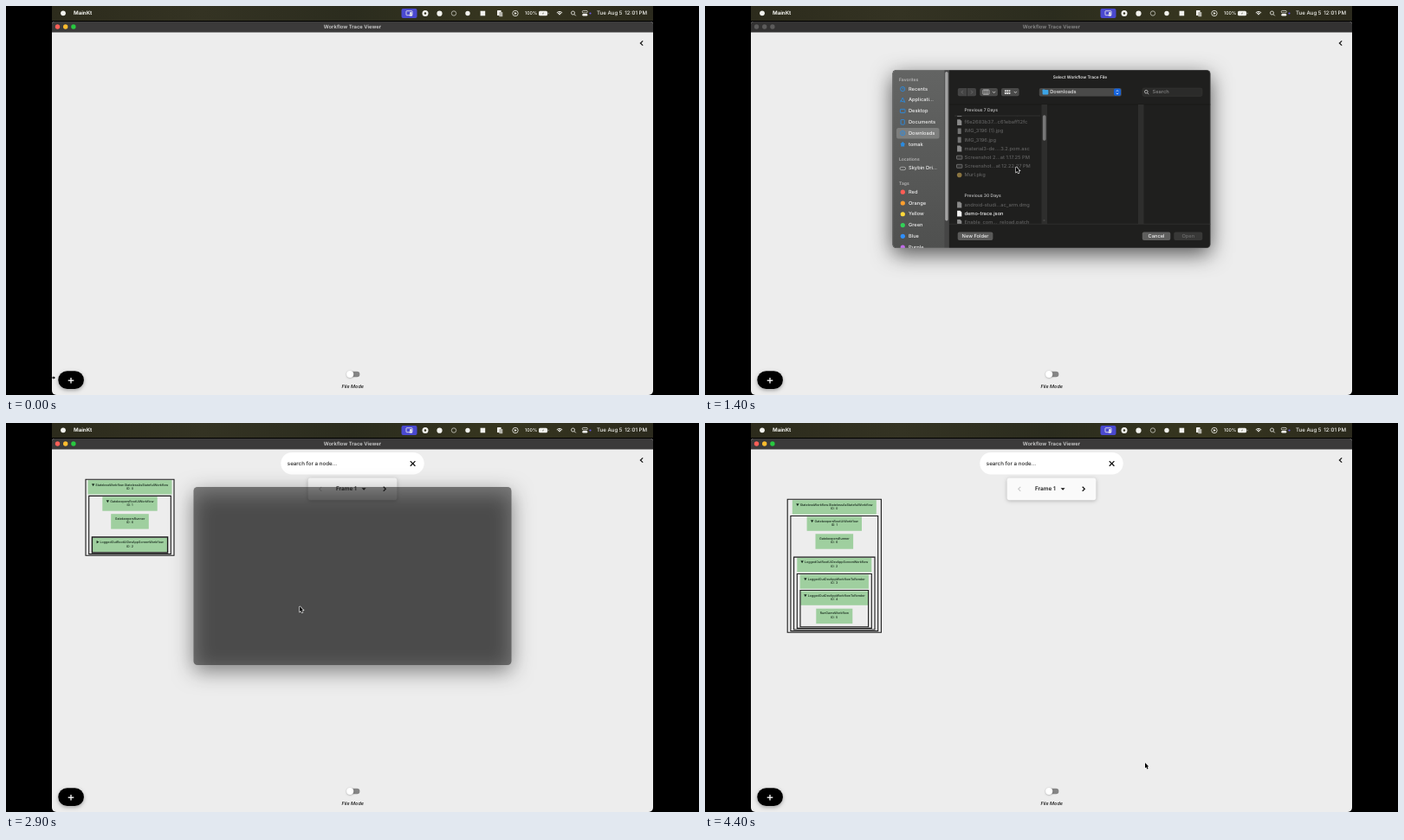
Animation of 800 by 450 pixels, one loop 4500 ms. Source, as an HTML page with a canvas:

```html
<!DOCTYPE html>
<html lang="en">
<head>
<meta charset="utf-8">
<title>Workflow Trace Viewer</title>
<style>
html, body { margin: 0; width: 100%; height: 100%; overflow: hidden; background: #000; }
canvas { display: block; }
</style>
</head>
<body>
<canvas id="stage" width="800" height="450"></canvas>
<script>
const ctx = document.getElementById('stage').getContext('2d');
const LOOP = 4500, STEP = 100, ROW = 10.15;
const BLUE = '#2b8be0';

function box(x, y, w, h, r, fill, stroke, width = 1) {
  ctx.beginPath();
  ctx.roundRect(x, y, w, h, r);
  if (fill) { ctx.fillStyle = fill; ctx.fill(); }
  if (stroke) { ctx.strokeStyle = stroke; ctx.lineWidth = width; ctx.stroke(); }
}

function dot(x, y, r, fill, stroke, width) {
  box(x - r, y - r, 2 * r, 2 * r, r, fill, stroke, width);
}

function line(points, color, width = 1) {
  ctx.beginPath();
  points.forEach(([x, y]) => ctx.lineTo(x, y));
  ctx.strokeStyle = color;
  ctx.lineWidth = width;
  ctx.stroke();
}

function poly(points, fill) {
  ctx.beginPath();
  points.forEach(([x, y]) => ctx.lineTo(x, y));
  ctx.closePath();
  ctx.fillStyle = fill;
  ctx.fill();
}

function text(s, x, y, size, color, weight = 500, align = 'left', style = 'normal') {
  ctx.font = `${style} ${weight} ${size}px Inter, "Noto Sans", sans-serif`;
  ctx.textAlign = align;
  ctx.textBaseline = 'middle';
  ctx.fillStyle = color;
  ctx.fillText(s, x, y);
}

function chevron(x, y, dx, dy, color, width = 1.2) {
  line([[x + dx, y - dy], [x - dx, y], [x + dx, y + dy]], color, width);
}

function shadowed(color, blur, dy, draw) {
  ctx.save();
  ctx.shadowColor = color;
  ctx.shadowBlur = blur;
  ctx.shadowOffsetY = dy;
  draw();
  ctx.restore();
}

// Linear interpolation over keys of the form [time, ...values].
function at(keys, t) {
  let i = keys.findIndex(k => k[0] > t);
  if (i < 0) return keys[keys.length - 1].slice(1);
  if (i === 0) return keys[0].slice(1);
  const a = keys[i - 1], b = keys[i], p = (t - a[0]) / (b[0] - a[0]);
  return a.slice(1).map((v, j) => v + (b[j + 1] - v) * p);
}

const pointerPath = [
  [0, 54, 430], [300, 74, 431], [500, 75, 432], [800, 149, 386], [1100, 310, 222],
  [1400, 359, 186], [1900, 357, 190], [2300, 339, 212], [2900, 339, 212],
  [3100, 106, 138], [3200, 108, 140], [3300, 112, 158], [3400, 116, 178],
  [3600, 404, 251], [3700, 402, 252], [4200, 504, 394], [4300, 507, 394], [4400, 508, 393]
];
const scrollPath = [[1200, 0], [1400, 74.5], [1700, 185], [2300, 268.9]];

const shots = ['10.20.07 AM', '', '10.55.14 AM', '11.44.33 AM', '11.52.30 AM']
  .map(s => s ? 'Screenshot…at ' + s : 'Screenshot…0.55.07 AM (2)');
const sections = [
  { title: 'Today', y: 120.5, first: 134.5, rows: ['file_select.mp4', 'live_mode.mp4'] },
  { title: 'Previous 7 Days', y: 168.3, first: 178.6, rows: [
    '5d0c3de5f8…799c544b30', 'Enable_com…load (1).patch', 'Enable_com…load (2).patch',
    'f6e2683b37…c61ebaff12fc', 'IMG_3196 (1).jpg', 'IMG_3196.jpg',
    'material3-de….3.2.pom.asc', 'Screenshot 2…at 1.17.25 PM',
    'Screenshot…at 12.22.27 PM', 'Murl.pkg'] },
  { title: 'Previous 30 Days', y: 293.5, first: 304.5, rows: [
    'android-studi…ac_arm.dmg', 'demo-trace.json', 'Enable_com…_reload.patch',
    'IMG_3102.jpg', 'IMG_3103.jpg', 'IMG_3108.jpg',
    'Screenshot…at 9.41.18 AM', 'Screenshot…at 9.58.40 AM', 'Screenshot…at 10.12.51 AM',
    ...shots, 'taxi thurs morn.PNG', 'taxi wed after.PNG', 'taxi wed morn.PNG',
    'workflow-tra…_100257.json', 'workflow-trace.json'] },
  { title: 'June', y: 510.4, first: 520.9, rows: ['state-names…0.4.23.cd.log'] }
];

const places = ['Recents', 'Applicati…', 'Desktop', 'Documents', 'Downloads', 'tomak'];
const tags = [['Red', '#ff5d55'], ['Orange', '#ff9f2e'], ['Yellow', '#ffd83a'],
  ['Green', '#32d158'], ['Blue', '#2f8fff'], ['Purple', '#bf6be8']];

function menuBar() {
  const g = ctx.createLinearGradient(53, 0, 747, 0);
  ['#2c2b1c', '#343323', '#2b2c1e', '#37361f', '#2b2a1d'].forEach((c, i) => g.addColorStop(i / 4, c));
  ctx.fillStyle = g;
  ctx.fillRect(53, 0, 694, 17);
  const w = '#f2f2ee';
  dot(66, 8.3, 2.9, w);
  text('MainKt', 78, 8.5, 6.1, w, 700);
  box(456.5, 3, 18, 11, 2, '#4a49d0');
  box(462, 5.7, 7, 5, .6, null, w, .8);
  dot(467.3, 8.3, 1.2, w);
  box(465.7, 9.6, 3.4, 1.8, .6, w);
  dot(484, 8.5, 3.5, w);
  dot(484, 8.5, 1.2, '#33321f');
  dot(500.5, 8.7, 3.1, w);
  dot(517, 8.5, 2.7, null, '#c9c9c0', .8);
  dot(533, 8.5, 2.7, w);
  box(547.6, 5.7, 5.6, 5.6, 0, w);
  box(567, 5, 4.6, 6, .6, w);
  box(569.3, 7, 4, 5.3, .6, '#b5b5ac');
  dot(588, 8.5, 3.2, null, w, .8);
  poly([[587, 6.9], [587, 10.1], [589.8, 8.5]], w);
  text('100%', 599, 8.6, 5.3, w);
  box(615, 5.7, 10, 5.6, 1.5, w);
  box(625.6, 7.5, .9, 2, .4, '#aaa');
  text('⚡', 620, 8.6, 4, '#33321f', 500, 'center');
  for (const r of [1.5, 3, 4.5]) {
    ctx.beginPath();
    ctx.arc(639, 11, r, -Math.PI * .75, -Math.PI * .25);
    ctx.strokeStyle = w;
    ctx.lineWidth = 1;
    ctx.stroke();
  }
  dot(654.5, 8, 2, null, w, .8);
  line([[656, 9.5], [657.7, 11.3]], w, .9);
  box(665.3, 5.4, 6, 2.5, 1.2, null, w, .7);
  box(665.3, 9, 6, 2.5, 1.2, w);
  dot(674.5, 8.5, 1.1, '#6a5be8');
  text('Tue Aug 5', 682, 8.5, 6.1, w);
  text('12:01 PM', 740, 8.5, 6.1, w, 500, 'right');
}

function appWindow(active) {
  box(53, 18, 694, 432, [3, 3, 5, 5], '#ededed');
  box(53, 18, 694, 12.5, [3, 3, 0, 0], active ? '#3b3a3a' : '#333232');
  const lights = active ? ['#ff5f57', '#febc2e', '#28c840'] : Array(3).fill('#5c5b5b');
  lights.forEach((c, i) => dot(59.5 + i * 9.2, 24, 2.7, c));
  text('Workflow Trace Viewer', 400, 23.8, 5.9, active ? '#cfcfcf' : '#8a8a8a', 600, 'center');
  chevron(733.8, 43, 1.4, 2.6, '#111', 1.2);

  shadowed('rgba(0,0,0,.35)', 4, 1.5, () => box(60.3, 422.3, 29.6, 20.8, 10.4, '#000'));
  line([[71.7, 433.2], [78.3, 433.2]], '#fff', 1.3);
  line([[75, 429.9], [75, 436.5]], '#fff', 1.3);
  box(396, 422.7, 12.4, 6.6, 3.3, '#858585');
  shadowed('rgba(0,0,0,.3)', 2, .5, () => dot(397.2, 426, 4.1, '#fff'));
  text('File Mode', 400.2, 440.3, 5.5, '#111', 500, 'center', 'italic');
}

function node(cx, y, half, label, id, height = 16.4) {
  ctx.fillStyle = '#9fcf9f';
  ctx.fillRect(cx - half, y, half * 2, height);
  text(label, cx, y + 5.4, 3.65, '#14251a', 500, 'center');
  text('ID: ' + id, cx, y + 10, 3.65, '#14251a', 500, 'center');
}

const levels = [
  ['StatelessWorkflow.StatelessAsStatefulWorkflow', 0, 48.5],
  ['GatekeepersRootUiWorkflow', 19.2, 31.7],
  ['LoggedOutRootUiDevAppScreenWorkflow', 66.8, 43],
  ['LoggedOutDevAppWorkflowToRender', 86.2, 39.6],
  ['LoggedOutDevAppWorkflowToRender', 105.2, 39]
];

function tree(cx, top, depth, open) {
  const inner = open ? 39.3 : 43.6;
  const end = levels[depth][1] + (open ? 42.3 : 18);
  for (let i = 0; i <= depth; i++) {
    const [label, y, half] = levels[i], up = depth - i;
    const w = inner + 3.7 * up, folded = i === depth && !open;
    node(cx, top + y + .9, half, (folded ? '► ' : '▼ ') + label, i);
    box(cx - w, top + y, 2 * w, end - y + 1.6 * up, 0, null, '#1a1a1a', folded ? 1.4 : 1.1);
  }
  node(cx, top + 40, 21.8, 'GatekeepersRunner', 6, 17.4);
  if (open) node(cx, top + 126.4, 21, 'RunGameWorkflow', 5, 17.4);
}

function traceView(t) {
  if (t < 3200) tree(143, 65.2, 2, false);
  else if (t < 3300) tree(146.5, 65.2, 3, false);
  else if (t < 3400) tree(149.3, 65.2, 4, false);
  else tree(149.3, t < 3500 ? 65.2 : 88.3, 4, true);

  box(317.3, 34, 165.4, 25.5, 12.7, '#fff');
  text('search for a node...', 324.8, 47, 6.2, '#222');
  line([[466.8, 44.1], [472.4, 49.7]], '#111', 1.3);
  line([[472.4, 44.1], [466.8, 49.7]], '#111', 1.3);
  shadowed('rgba(0,0,0,.25)', 4, 1, () => box(348.6, 63.4, 102.8, 25.8, 3, '#fafafa'));
  chevron(363, 76.3, 1.3, 2.5, '#c8c8c8', 1.1);
  text('Frame 1', 381, 76.4, 6.4, '#1c1c1c', 600);
  poly([[410.6, 75.2], [415.6, 75.2], [413.1, 77.8]], '#111');
  chevron(437, 76.3, -1.3, 2.5, '#111', 1.2);
}

function fileIcon(name, y, color) {
  const x = 293.7;
  if (/Screenshot|mp4/.test(name)) box(x - 3.2, y - 2, 6.4, 4, .5, /\(2\)|PM|mp4/.test(name) ? '#333' : '#777', '#858585', .7);
  else if (/jpg|PNG/.test(name)) box(x - 2, y - 3.3, 4, 6.6, .3, '#737373');
  else if (/pkg/.test(name)) dot(x, y, 2.8, '#8a7440');
  else poly([[x - 2.6, y - 3.4], [x + .8, y - 3.4], [x + 2.6, y - 1.6], [x + 2.6, y + 3.4], [x - 2.6, y + 3.4]], color);
}

function fileList(scroll, picked) {
  const sticky = sections.filter(s => s.y - scroll <= 121).pop();
  text(sticky.title, 299.5, 120.7, 5, '#b4b4b4', 600);
  line([[288, 127], [387, 127]], '#3c3c3b', .6);
  ctx.save();
  ctx.beginPath();
  ctx.rect(282, 127, 106.5, 125);
  ctx.clip();
  for (const s of sections) {
    if (s !== sticky) text(s.title, 299.5, s.y - scroll, 5, '#b4b4b4', 600);
    s.rows.forEach((name, i) => {
      const y = s.first + i * ROW - scroll;
      if (y < 115 || y > 260) return;
      const json = /json/.test(name), hit = picked && /100257/.test(name);
      if (hit) box(287, y - 5, 97, 10, 2, '#0a5ad6');
      fileIcon(name, y, json ? '#f4f4f4' : '#8a8a8a');
      text(name, 299.5, y, 5.7, json ? '#f0f0f0' : '#606060');
    });
  }
  ctx.restore();
  for (const x of [388.5, 500]) box(x, 114, 6.5, 138, 0, '#2e2e2d');
  box(389.9, 115.3 + scroll * .147, 3.7, 29.5, 1.8, '#777');
  line([[390.5, 248], [392.5, 248]], '#666', .7);
}

function placeIcon(i, y) {
  const x = 228.2;
  if (i === 1) line([[x - 2.6, y + 2.5], [x, y - 2.7], [x + 2.6, y + 2.5], [x - 2.6, y + .8]], BLUE, .9);
  else if (i === 2) box(x - 2.8, y - 2.2, 5.6, 4.2, .6, null, BLUE, .9);
  else if (i === 3) box(x - 2.1, y - 2.8, 4.2, 5.6, .6, null, BLUE, .9);
  else if (i === 5) poly([[x - 3, y], [x, y - 3], [x + 3, y], [x + 2, y], [x + 2, y + 2.7], [x - 2, y + 2.7], [x - 2, y]], BLUE);
  else {
    dot(x, y, 2.6, null, BLUE, .9);
    line(i ? [[x, y - 1.4], [x, y + 1.4]] : [[x, y - 1.5], [x, y], [x + 1.2, y]], BLUE, .8);
  }
}

function sidebar(alpha) {
  const g = ctx.createLinearGradient(0, 74, 0, 280);
  g.addColorStop(0, '#636463');
  g.addColorStop(1, '#4f504f');
  ctx.fillStyle = g;
  ctx.fillRect(216.5, 74, 65, 206);
  ctx.fillStyle = '#454545';
  ctx.fillRect(276.5, 74, 5, 206);
  box(277.2, 76, 3.4, 172.5, 1.7, '#a3a3a3');
  box(221, 141, 49.5, 12.6, 2.5, '#7d7e7d');
  ctx.globalAlpha = alpha;
  [['Favorites', 85.3], ['Locations', 177.2], ['Tags', 205]].forEach(([s, y]) => text(s, 224, y, 5, '#b5b5b5', 600));
  places.forEach((s, i) => {
    const y = 96 + i * 12.78;
    placeIcon(i, y);
    text(s, 235, y, 5.7, '#f0f0f0');
  });
  box(225, 186.3, 6.6, 3.4, 1.7, null, '#b5b5b5', .8);
  text('Skybin Dri…', 235, 187.7, 5.7, '#f0f0f0');
  tags.forEach(([s, c], i) => {
    const y = 215.2 + i * 12.78;
    dot(228.3, y, 2.6, c);
    text(s, 235, y, 5.7, '#f0f0f0');
  });
  ctx.globalAlpha = 1;
}

function toolbar(ready) {
  const ink = ready ? '#dedede' : '#999';
  text('Select Workflow Trace File', 433, 82.2, 4.85, '#e2e2e2', 600, 'center');
  box(291.8, 94.9, 10.3, 9.4, [2, 0, 0, 2], '#444');
  box(302.7, 94.9, 10.3, 9.4, [0, 2, 2, 0], '#444');
  chevron(297, 99.6, .8, 1.8, '#777', .8);
  chevron(308, 99.6, -.8, 1.8, '#777', .8);
  for (const x of [317.3, 342]) {
    box(x, 94.9, 20.6, 9.4, 2, '#4a4a49');
    line([[x + 14.7, 98.9], [x + 16.3, 100.5], [x + 17.9, 98.9]], ink, .8);
  }
  box(320.9, 97, 7, 5.2, .5, null, ink, .7);
  line([[323.2, 97], [323.2, 102.2]], ink, .7);
  line([[325.6, 97], [325.6, 102.2]], ink, .7);
  for (let i = 0; i < 6; i++) box(346 + i % 3 * 2.3, 97.3 + (i / 3 | 0) * 2.7, 1.7, 2, .2, ink);
  box(385.8, 94.9, 95, 9.6, 2, '#4a4a49');
  box(389.6, 97, 6.8, 5.4, .8, '#3ca4e6');
  box(389.6, 96.4, 3, 2, .6, '#3ca4e6');
  text('Downloads', 398.2, 99.7, 5.7, '#e6e6e6');
  if (ready) box(472, 95.6, 8, 8.2, 1.8, '#1463dd');
  line([[474.7, 98.9], [476, 97.5], [477.3, 98.9]], '#fff', .7);
  line([[474.7, 100.6], [476, 102], [477.3, 100.6]], '#fff', .7);
  box(505, 95, 69, 9.4, 2, '#2b2b2a', '#383837', .5);
  dot(509.3, 99.2, 1.8, null, '#d0d0d0', .8);
  line([[510.6, 100.5], [512.2, 102.2]], '#d0d0d0', .8);
  text('Search', 516.5, 99.7, 5.7, '#858585');
}

function dialogBody(scroll, picked, ready) {
  ctx.save();
  ctx.beginPath();
  ctx.roundRect(216.5, 74, 367, 206, 4.5);
  ctx.clip();
  sidebar(ready ? 1 : .45);
  toolbar(ready);
  line([[282, 114], [584, 114]], '#151514', .6);
  fileList(scroll, picked);
  line([[282, 252.3], [584, 252.3]], '#343433', .7);
  const button = (s, x, w, fill, ink) => {
    box(x, 261.6, w, 9.5, 2, fill);
    text(s, x + w / 2, 266.5, 5.7, ink, 500, 'center');
  };
  button('New Folder', 291.7, 40.7, ready ? '#5a5a59' : '#434342', ready ? '#ededed' : '#7a7a7a');
  button('Cancel', 504.8, 32.5, '#5f5f5e', '#f4f4f4');
  button('Open', 541.3, 33, '#383837', '#6c6c6c');
  ctx.restore();
  box(216.8, 74.3, 366.4, 205.4, 4.3, null, 'rgba(150,150,150,.45)', .6);
}

function dialog(t) {
  if (t < 800 || t >= 3000) return;
  if (t >= 2900) {
    shadowed('rgba(0,0,0,.9)', 24, 7, () => box(216.5, 74, 367, 206, 4.5, 'rgba(29,29,29,.52)'));
    return;
  }
  const ready = t >= 900, scale = ready ? 1 : .918;
  ctx.save();
  ctx.translate(400, 177);
  ctx.scale(scale, scale);
  ctx.translate(-400, -177);
  shadowed('rgba(0,0,0,.65)', 24, 7, () => box(216.5, 74, 367, 206, 4.5, ready ? '#1f1f1e' : '#2a2a29'));
  dialogBody(at(scrollPath, t)[0], t >= 2500, ready);
  ctx.restore();
}

function pointer(t) {
  if (t < 100) {
    line([[53, 430], [55, 430]], '#000', 1);
    poly([[54.6, 428.2], [57, 430], [54.6, 431.8]], '#000');
    return;
  }
  const [x, y] = at(pointerPath, t);
  const arrow = [[0, 0], [0, 6.3], [1.4, 5], [2.5, 7.4], [3.6, 6.9], [2.6, 4.6], [4.4, 4.5], [0, 0]]
    .map(([a, b]) => [x + a, y + b]);
  line(arrow, '#fff', 1.1);
  poly(arrow, '#000');
}

function draw(t) {
  ctx.fillStyle = '#000';
  ctx.fillRect(0, 0, 800, 450);
  ctx.textRendering = 'geometricPrecision';
  menuBar();
  appWindow(t < 800 || t >= 2900);
  if (t >= 2900) traceView(t);
  dialog(t);
  pointer(t);
}

const start = performance.now();
function tick() {
  const t = (performance.now() - start) % LOOP;
  draw(Math.floor(t / STEP) * STEP);
  requestAnimationFrame(tick);
}
tick();
</script>
</body>
</html>
```
